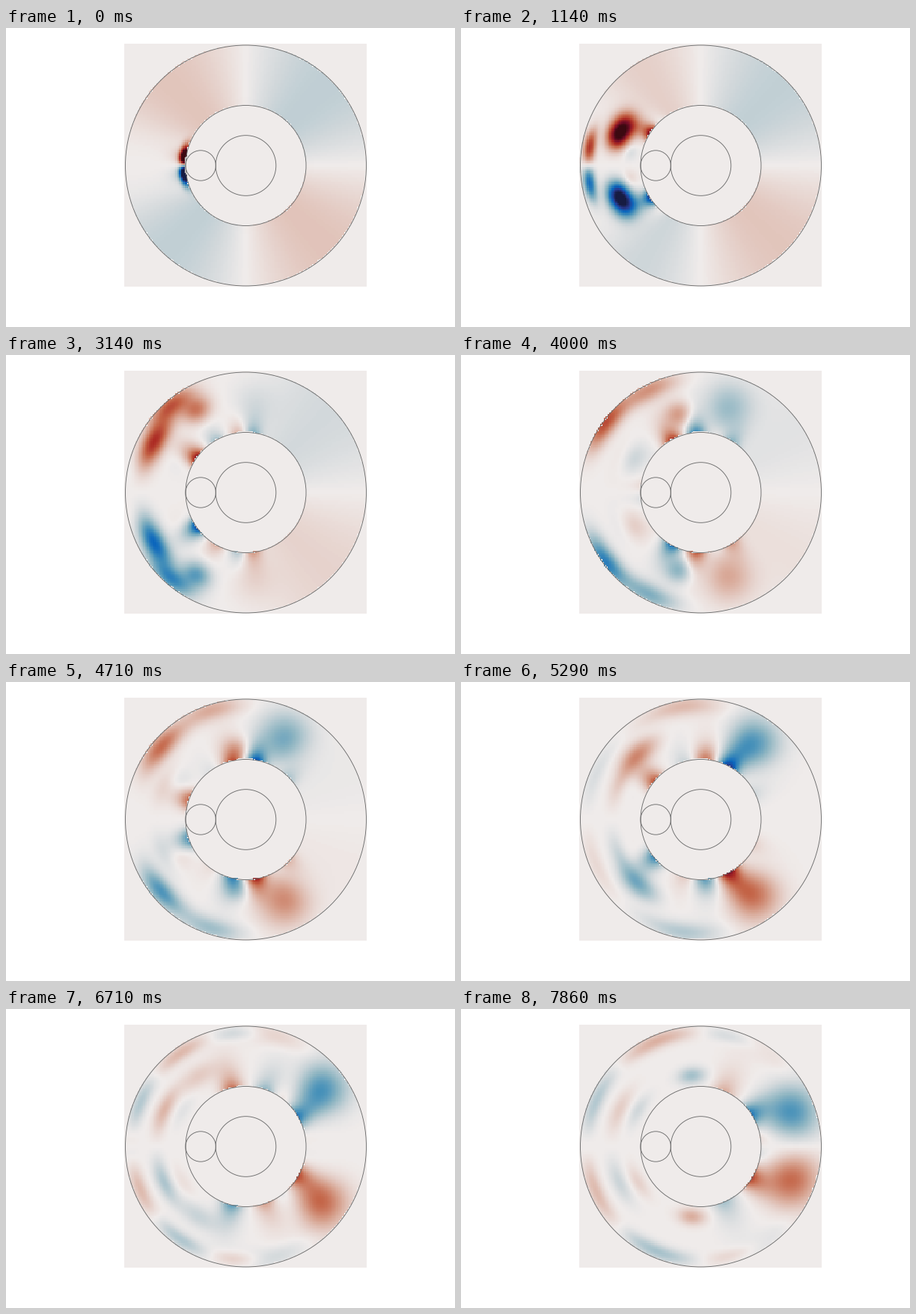
Animation of 600x400 px, one loop 8 s. Source, as a matplotlib script:

```python
import numpy as np
import matplotlib.pyplot as plt
from matplotlib.animation import FuncAnimation
from matplotlib.colors import LinearSegmentedColormap
from matplotlib.patches import Circle

W, H, DPI = 600, 400, 100
FRAMES, LOOP = 56, 8000
N = 128                                # cells per side
LEFT, RIGHT, TOP, BOTTOM = 158, 482, 21, 346
CX, CY = 320.5, 184
R_IN, R_OUT = 80.5, 161

STOPS = [(0, "#171c42"), (1, "#293a8f"), (2, "#0b66bd"), (3, "#4590b9"),
         (4, "#8eb5c2"), (5, "#d2d8db"), (5.5, "#f0eceb"), (6, "#e6d2cc"),
         (7, "#d59d89"), (8, "#c46548"), (9, "#ac2b24"), (10, "#780e28"),
         (11, "#3c0911")]
CMAP = LinearSegmentedColormap.from_list(
    "balance", [(p / 11, c) for p, c in STOPS], N=512)

# Polar cell coordinates; phi is measured in degrees from the left.
xs = ((np.arange(N) + 0.5) / N - 0.5) * (RIGHT - LEFT)
ys = (0.5 - (np.arange(N) + 0.5) / N) * (BOTTOM - TOP)
X, Y = np.meshgrid(xs, ys)
RAD = np.hypot(X, Y)
PHI = np.degrees(np.arctan2(np.abs(Y), -X))
SIDE = np.sign(Y)
RING = (RAD > R_IN) & (RAD < R_OUT)
RIM = RING & ((RAD > R_OUT - 0.55) | (RAD < R_IN + 0.4))


def gauss(x, mid, width):
    return np.exp(-((x - mid) / width) ** 2)


def ramp(x, start, end):
    u = np.clip((x - start) / (end - start), 0, 1)
    return u * u * (3 - 2 * u)


def behind(phi, width):
    """One for cells that a front at angle phi has already passed."""
    return 1 / (1 + np.exp(np.clip((PHI - phi) / width, -50, 50)))


def odd(phi, width):
    """Angular bump with mirror images that cancel it on the axis."""
    return gauss(PHI, phi, width) - gauss(-PHI, phi, width) - gauss(360 - PHI, phi, width)


def body(amp, r, phi, w_r, w_phi):
    return amp * gauss(RAD, r, w_r) * odd(phi, w_phi)


def surface(t, amp, phi0, speed, peak, span):
    """Packet that clings to the inner rim and spreads as it runs."""
    phi = phi0 + speed * t
    amp = amp * gauss(t, peak, span) * np.clip(phi / 10, 0, 1)
    return amp * np.exp((R_IN - RAD) / (8 + 0.25 * t)) * odd(phi, 7 + 0.07 * t)


def slow_mode(t):
    swing = 0.14 * np.cos(np.pi * t / 74)
    return swing * np.sin(np.radians(2 * PHI)) * (1 - behind(18 + 3.9 * t, 8))


def surface_train(t):
    return (surface(t, 0.85, 8, 3.6, 6, 13)
            + surface(t, 0.8, -42, 3.7, 19, 17)
            + surface(t, -0.3, 21, 3.6, 22, 14)
            + surface(t, -0.8, -15, 3.6, 37, 14)
            + surface(t, 0.5, -112, 4.1, 37, 20)
            + surface(t, -0.6, -78, 4.1, 60, 18))


def shear_waves(t):
    # Main arc: crosses the ring, then follows the outer rim
    v = body(0.9 / (1 + (t / 22) ** 3), min(82 + 5 * t, 153), 5 + 2.1 * t,
             6 + 8 * ramp(t, 0, 8), 7 + 0.25 * t)
    # Upper arm: rises and falls back to the inner rim
    v += body(0.65 * gauss(t, 0, 30), 82 + 50 * np.sin(np.pi * min(t / 34, 1)),
              13 + 2.2 * t, 6 + 11 * ramp(t, 0, 8), 9)
    # Second pulse, bouncing between the rims
    v += body(0.62 * gauss(t, 20, 20) * ramp(t, 11, 15),
              R_IN + 77 * abs(np.sin(np.pi * (t - 13) / 29)), 23 + 1.1 * (t - 16), 14, 14)
    # Trough behind the first arc
    v += body(-0.16 * gauss(t, 12, 6), 64 + 4.5 * t, 11, 9, 7)
    return v


def pressure_waves(t):
    v = body(0.65 * gauss(t, 8, 4), min(80 + 10 * t, 160), 3 * t - 12, 8, 9)
    # Broad leading lobe that ends at the right
    v += body(-0.42 * ramp(t, 14, 40), 118 + 0.45 * (t - 28), 108 + 1.93 * (t - 28), 34, 14)
    return v


def echoes(t):
    # Standing ripples on the outer rim, and weaker ones further in
    wave = 66 + 0.4 * (t - 47) ** 2
    v = (-0.18 * ramp(t, 31, 45) * np.cos(2 * np.pi * (PHI - 22) / wave)
         * gauss(RAD, 152, 10) * behind(95 + 2 * (t - 47), 8) * np.tanh(PHI / 12))
    v += body(0.19 * gauss(t, 46, 12), 119, 24, 10, 15)
    v += body(-0.1 * gauss(t, 28, 6), 98, 27, 14, 12)
    v += body(-0.12 * gauss(t, 52, 6), 96, 30, 9, 14)
    v += body(-0.25 * gauss(t, 57, 5), 95, 83, 11, 11)
    return v


def field(t):
    v = slow_mode(t) + surface_train(t) + shear_waves(t) + pressure_waves(t) + echoes(t)
    return np.where(RING, v * SIDE, 0)


fig = plt.figure(figsize=(W / DPI, H / DPI), dpi=DPI, facecolor="white")
ax = fig.add_axes([0, 0, 1, 1])
img = ax.imshow(field(0), cmap=CMAP, vmin=-1, vmax=1, aspect="auto",
                interpolation="nearest", extent=(LEFT, RIGHT, BOTTOM, TOP))
specks = ax.scatter([], [], s=2, marker="s", color="white", linewidths=0, zorder=2)
for x, r in [(CX, R_OUT), (CX, R_IN), (CX, 40.3), (CX - 60.3, 20.2)]:
    ax.add_patch(Circle((x, CY), r, fill=False, ec="#6c6c6c", lw=0.65, zorder=3))
ax.set(xlim=(0, W), ylim=(H, 0))
ax.axis("off")


def update(i):
    v = field(i)
    img.set_data(v)
    hit = RIM & (np.abs(v) > 0.11)
    specks.set_offsets(np.column_stack([CX + X[hit], CY - Y[hit]]))
    return img, specks


anim = FuncAnimation(fig, update, frames=FRAMES, interval=LOOP / FRAMES,
                     repeat=True, repeat_delay=0, blit=False)
plt.show()
```
